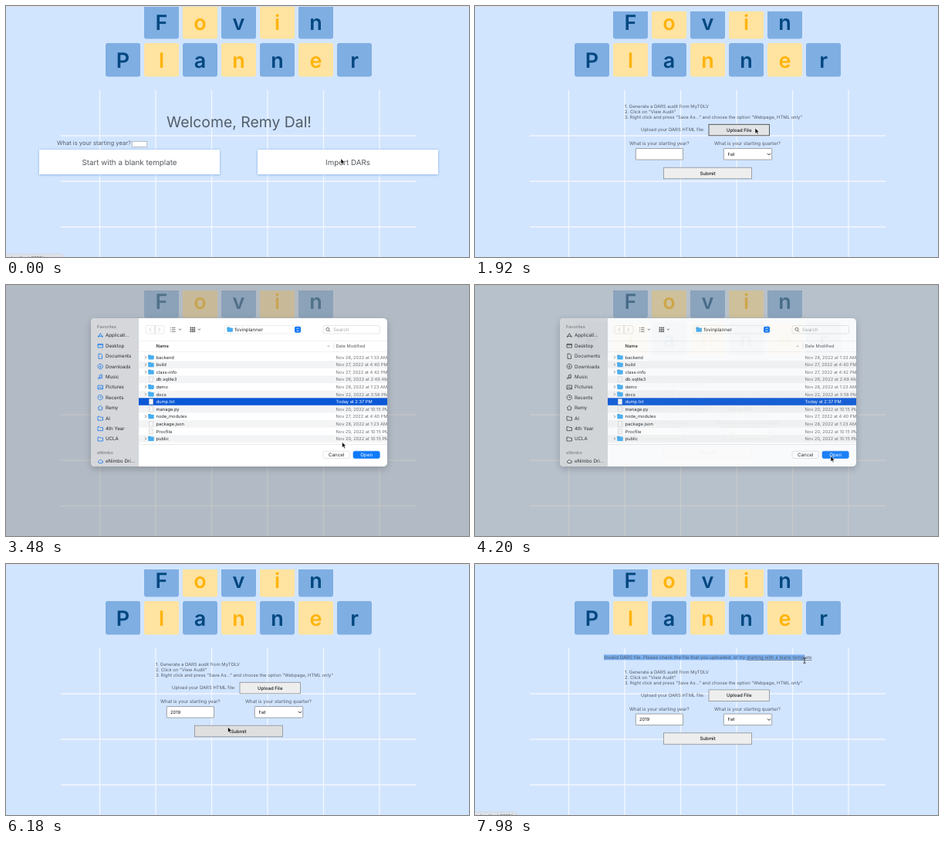
An HTML page that plays this animation: 600 by 325 pixels, repeating every 8 s.

```html
<!DOCTYPE html>
<html lang="en">
<head>
<meta charset="utf-8">
<title>Planner import</title>
<style>
html, body { margin: 0; width: 100%; height: 100%; overflow: hidden; background: #d2e5fe; }
svg { display: block; width: 600px; height: 325px; }
text { font-family: Inter, "Open Sans", sans-serif; white-space: pre; text-rendering: geometricPrecision; }
</style>
</head>
<body>
<svg id="stage" viewBox="0 0 600 325"></svg>
<script>
const LOOP = 8000;
const INK = '#535d6a', LABEL = '#55585e';
const stage = document.getElementById('stage');

const rect = (x, y, w, h, fill, extra = '') =>
  `<rect x="${x}" y="${y}" width="${w}" height="${h}" fill="${fill}" ${extra}/>`;
const text = (x, y, size, content, fill = INK, extra = '') =>
  `<text x="${x}" y="${y}" font-size="${size}" fill="${fill}" ${extra}>${content}</text>`;
const line = (d, stroke, width = 1, extra = '') =>
  `<path d="${d}" fill="none" stroke="${stroke}" stroke-width="${width}" ${extra}/>`;
const group = (id, content, extra = '') => `<g id="${id}" ${extra}>${content}</g>`;
const MIDDLE = 'text-anchor="middle"';

function tiles(word, left, top) {
  return [...word].map((letter, i) => {
    const x = left + i * 50, blue = i % 2 === 0;
    return rect(x, top, 45, 43.5, blue ? '#7faee2' : '#ffe3a0', 'rx="3"') +
      text(x + 22.5, top + 31.5, 27, letter, blue ? '#00477f' : '#ffb30a', `${MIDDLE} font-weight="600"`);
  }).join('');
}

function backdrop() {
  let grid = '';
  for (let i = 0; i < 6; i++) grid += `M${121.5 + i * 72.5} 109V325`;
  for (let i = 0; i < 3; i++) grid += `M71 ${168 + i * 59}H532`;
  return rect(0, 0, 600, 325, '#d2e5fe') + line(grid, '#f3f8ff', 1.3) +
    tiles('Fovin', 179, -1) + tiles('Planner', 129, 48);
}

function welcomePage() {
  const card = (x, label) => rect(x, 186, 234, 32, '#fff', 'filter="url(#glow)"') +
    text(x + 117, 205.5, 9.8, label, LABEL, MIDDLE);
  return text(302, 157, 19.4, 'Welcome, Remy Dal!', INK, MIDDLE) +
    text(66, 180, 7.6, 'What is your starting year?') +
    rect(163.3, 175.3, 19.5, 7, '#fff', 'stroke="#a3a8b0" stroke-width=".7"') +
    card(43, 'Start with a blank template') + card(326, 'Import DARs');
}

function button(id, x, y, w, label) {
  return rect(x, y, w, 14.5, '#eee', `id="${id}" stroke="#8b8f95" stroke-width=".8"`) +
    text(x + w / 2, y + 9.5, 6.05, label, '#15181c', `${MIDDLE} font-weight="500"`);
}

function importPage() {
  const steps = ['1. Generate a DARS audit from MyTOLV', '2. Click on "View Audit"',
    '3. Right click and press "Save As..." and choose the option "Webpage, HTML only"'];
  const field = (id, x, w) =>
    rect(x, 184.5, w, 14.5, '#fff', `id="${id}" rx=".5" stroke="#8b8f95" stroke-width=".8"`);
  const form = steps.map((step, i) => text(194, 132.2 + i * 7, 5.9, step)).join('') +
    text(215, 162.3, 5.95, 'Upload your DARS HTML file:') + button('upload', 303, 153.3, 78.5, 'Upload File') +
    text(200, 180.2, 6.15, 'What is your starting year?') +
    text(310, 180.2, 6.15, 'What is your starting quarter?') +
    field('yearField', 208.3, 61.2) + text(213, 193.7, 5.8, '', '#111', 'id="year"') +
    field('quarter', 322.3, 62.4) + text(327.5, 193.7, 5.6, 'Fall', '#111') +
    line('M379 190.8l2 2l2-2', '#222', 1) +
    button('submit', 244.5, 209.2, 114, 'Submit');
  const error = rect(167, 117.3, 0, 7, '#79aff1', 'id="selection"') +
    text(302, 123.2, 6.1, 'Invalid DARS file. Please check the file that you uploaded, or try ' +
      '<tspan text-decoration="underline">starting with a blank template</tspan>', INK, MIDDLE);
  return rect(0, 0, 600, 7, '#d2e5fe') + group('form', form) + group('error', error);
}

const folder = (x, y) => rect(x, y - 3.2, 3.6, 3, '#3d9be0', 'rx=".8"') +
  rect(x, y - 2.4, 7.4, 5.4, '#45adf0', 'rx=".8"');

function sidebar() {
  const outlineFolder = 'M0 1h2.5l1 1H6.5V6H0Z';
  const items = [
    ['Applicati...', 'M.3 6L3.3 .5L6.3 6M0 4.3H6.6'],
    ['Desktop', 'M0 1H6.5V5.6H0ZM0 2.2H6.5'],
    ['Documents', 'M1 .3H4L5.5 2V6.5H1Z'],
    ['Downloads', 'M3.2 0a3.2 3.2 0 1 0 .01 0M3.2 1.5V4.6M1.9 3.4L3.2 4.7L4.5 3.4'],
    ['Music', 'M2.3 5.2V1L5.3 .4V4.6M2.3 5.2a1 .8 0 1 1-.1-.5M5.3 4.6a1 .8 0 1 1-.1-.5'],
    ['Pictures', 'M0 1H6.5V5.8H0ZM.3 5.2L2.4 3L4 4.6L5 3.7L6.3 5'],
    ['Recents', 'M3.2 0a3.2 3.2 0 1 0 .01 0M3.2 1.4V3.4H4.8'],
    ['Remy', 'M0 3.2L3.2 .4L6.4 3.2M1 2.6V6H5.4V2.6'],
    ['AI', outlineFolder], ['4th Year', outlineFolder], ['UCLA', outlineFolder]];
  const item = ([label, icon], y) => line(icon, 'currentColor', .8, `transform="translate(119 ${y - 3.2})"`) +
    text(129, y + 2.2, 6.2, label, '#26282b');
  const heading = (label, y) => text(118, y, 5.6, label, '#85888c', 'font-weight="600"');
  return group('sidebar', rect(110, 43, 62, 192, '#d5d7da') + heading('Favorites', 56) +
    items.map((entry, i) => item(entry, 65.2 + i * 13.4)).join('') + heading('eNimbo', 219.2) +
    item(['eNimbo Dri...', 'M1.5 5.5a1.6 1.6 0 0 1 0-3a2 2 0 0 1 3.6 0a1.5 1.5 0 0 1 0 3Z'], 228.2));
}

function toolbar() {
  const caret = x => line(`M${x} 56.8l1.4 1.4l1.4-1.4`, '#444', .9);
  let dots = '';
  for (let i = 0; i < 9; i++) dots += rect(238.5 + i % 3 * 2.4, 54.5 + Math.floor(i / 3) * 2.4, 1.8, 1.8, '#555');
  return rect(181, 52.5, 24, 10.5, '#fff', 'rx="2" stroke="#e3e3e3" stroke-width=".7"') +
    line('M188 55.3l-2 2.5l2 2.5M197.5 55.3l2 2.5l-2 2.5M193 53V62.5', '#bfc1c4', .8) +
    line('M213 55.3h1M215 55.3h4.5M213 57.8h1M215 57.8h4.5M213 60.3h1M215 60.3h4.5', '#555', .8) +
    caret(224) + dots + caret(249) +
    rect(283, 52.5, 100, 10.5, '#fff', 'rx="2" stroke="#e6e6e6" stroke-width=".7"') +
    folder(286.5, 57.8) + text(296.5, 60, 6.2, 'fovinplanner', '#26282b') +
    rect(374, 53.8, 8, 8, '#1278f3', 'rx="1.8"') +
    line('M376.6 57L378 55.6L379.4 57M376.6 58.6L378 60L379.4 58.6', '#fff', .8) +
    rect(411, 52.5, 73.5, 10.5, '#fff', 'rx="2" stroke="#dcdcdc" stroke-width=".7"') +
    line('M418.9 57.3a2 2 0 1 0-4 0a2 2 0 1 0 4 0M418.3 58.8l1.8 1.8', '#555', .8) +
    text(424, 60, 6.2, 'Search', '#a5a7aa');
}

function fileList() {
  const at2022 = (day, time) => `Nov ${day}, 2022 at ${time}`;
  const files = [
    ['backend', at2022(28, '1:33 AM')], ['build', at2022(27, '4:40 PM')],
    ['class-info', at2022(27, '4:42 PM')], ['db.sqlite3', at2022(26, '2:49 AM')],
    ['demo', at2022(28, '1:23 AM')], ['docs', at2022(22, '3:58 PM')],
    ['dump.txt', 'Today at 2:37 PM'], ['manage.py', at2022(20, '10:15 PM')],
    ['node_modules', at2022(27, '4:40 PM')], ['package.json', at2022(28, '1:23 AM')],
    ['Procfile', at2022(20, '10:15 PM')], ['public', at2022(20, '10:15 PM')]];
  const head = text(194.5, 81.2, 5.8, 'Name', '#333', 'font-weight="600"') +
    text(427.5, 81.2, 5.7, 'Date Modified', '#55585c') +
    line('M416.5 80l1.5-1.5l1.5 1.5', '#888', .7) + line('M425 75V83', '#ddd', .7) +
    line('M172 72.5H494M172 86.5H494', '#ececec', .7);
  return head + files.map(([name, date], i) => {
    const y = 93.6 + i * 9.58;
    const isFolder = !name.includes('.') && name !== 'Procfile';
    const chosen = name === 'dump.txt';
    const icon = isFolder
      ? line(`M180 ${y - 1.8}l1.8 1.8l-1.8 1.8`, '#777', .8) + folder(184.3, y)
      : rect(185.5, y - 3.3, 5, 6.6, '#fff', 'stroke="#c9c9c9" stroke-width=".6"') +
        line(`M186.5 ${y - 1}h3M186.5 ${y + 1}h3`, '#ccc', .5);
    const stripe = chosen ? rect(172, y - 4.8, 322, 9.6, '#0a57d6', 'id="chosenRow"')
      : i % 2 ? rect(172, y - 4.8, 322, 9.6, '#f3f4f5') : '';
    const mark = chosen ? 'class="chosen"' : '';
    return stripe + icon + text(194.5, y + 2.1, 5.75, name, '#26282b', mark) +
      text(427.5, y + 2.1, 5.72, date, '#6d7074', mark);
  }).join('');
}

function dialog() {
  const pushButton = (id, x, label) =>
    rect(x, 215.2, 34.3, 9.2, '#fff', `id="${id}" rx="2" stroke="#d4d4d4" stroke-width=".6"`) +
    text(x + 17.2, 222.1, 6.2, label, '#26282b', `id="${id}Label" ${MIDDLE}`);
  return rect(110, 43, 384, 192, '#fff', 'rx="5" filter="url(#shadow)"') +
    group('panel', sidebar() + toolbar() + fileList() + line('M172 206.5H494', '#e2e2e2', .7) +
      pushButton('cancel', 411, 'Cancel') + pushButton('open', 450, 'Open'), 'clip-path="url(#panelClip)"');
}

stage.innerHTML = `<defs>
  <filter id="glow" x="-5%" y="-30%" width="110%" height="160%">
    <feDropShadow dx="0" dy="0.5" stdDeviation="1.8" flood-color="#5d93d6" flood-opacity=".75"/></filter>
  <filter id="shadow" x="-10%" y="-10%" width="120%" height="125%">
    <feDropShadow dx="0" dy="3" stdDeviation="5" flood-color="#000" flood-opacity=".22"/></filter>
  <clipPath id="panelClip">${rect(110, 43, 384, 192, '#fff', 'rx="5"')}</clipPath></defs>` +
  backdrop() + group('welcome', welcomePage()) + group('import', importPage()) +
  line('M0 .5H600', '#dcdee2', 1) +
  group('status', rect(-3, 321, 77, 8, '#dee2e8', 'id="statusBox" rx="2" stroke="#c3c8d0" stroke-width=".5"') +
    text(7, 327.5, 5.6, 'localhost:3000/app', '#555')) +
  rect(0, 0, 600, 325, '#989894', 'id="dim"') + group('dialog', dialog()) +
  group('arrow', '<path d="M0 0V7.2L1.7 5.7L2.9 8.3L4.1 7.7L2.9 5.2H5.1Z" fill="#000" stroke="#fff" stroke-width=".6"/>') +
  group('beam', line('M-1.5-3.5Q0-3.5 0-2.5Q0-3.5 1.5-3.5M0-3V3M-1.5 3.5Q0 3.5 0 2.5Q0 3.5 1.5 3.5', '#222', .8));

const $ = Object.fromEntries([...stage.querySelectorAll('[id]')].map(el => [el.id, el]));
const chosenTexts = stage.querySelectorAll('.chosen');

const clamp = v => Math.min(1, Math.max(0, v));
const ramp = (t, from, to) => clamp((t - from) / (to - from));
const ease = p => p * p * (3 - 2 * p);
const show = (el, on) => el.setAttribute('visibility', on ? 'visible' : 'hidden');
const set = (el, attrs) => { for (const key in attrs) el.setAttribute(key, attrs[key]); };

// time, x, y of the pointer tip
const pointerPath = [[480, 434, 197.5], [840, 447, 185], [1380, 363, 158], [2700, 363, 158], [2940, 362, 151],
  [3120, 362, 151], [3660, 461, 221.5], [4440, 461, 221.5], [5100, 238, 192], [5640, 238, 192],
  [5880, 275, 228], [6120, 287.5, 211], [6780, 287.5, 211], [7140, 167, 121], [7200, 167, 121],
  [7680, 430, 122], [7800, 430, 122], [7960, 427, 125]];

function pointerAt(t) {
  const next = pointerPath.findIndex(key => key[0] > t);
  if (next <= 0) return pointerPath[next ? pointerPath.length - 1 : 0].slice(1);
  const [t0, x0, y0] = pointerPath[next - 1], [t1, x1, y1] = pointerPath[next];
  const p = ease(ramp(t, t0, t1));
  return [x0 + (x1 - x0) * p, y0 + (y1 - y0) * p];
}

function render(t) {
  const [x, y] = pointerAt(t);
  const selecting = t >= 7110;
  show($.arrow, !selecting);
  show($.beam, selecting);
  set(selecting ? $.beam : $.arrow, { transform: `translate(${x} ${y})` });

  const importing = t >= 360;
  show($.welcome, !importing);
  show($.import, importing);
  show($.status, t < 420 || t >= 7500);
  set($.statusBox, { width: t < 420 ? 77 : 57 });

  const submitHover = t >= 6060 && t < 6840;
  set($.upload, { fill: t >= 1320 && t < 2100 ? '#e2e3e5' : '#eee',
    stroke: t >= 1860 && t < 2100 ? '#33373c' : '#8b8f95' });
  set($.submit, { fill: submitHover ? '#dfdfdf' : '#eee' });
  const focused = t >= 5100 && t < 6120;
  set($.yearField, { stroke: focused ? '#222' : '#8b8f95', 'stroke-width': focused ? 1.2 : .8 });
  $.year.textContent = '2019'.slice(0, Math.max(0, Math.floor((t - 5340) / 90) + 1));

  const failed = t >= 6540;
  show($.error, importing && failed);
  set($.form, { transform: `translate(0 ${failed ? 9.6 : 0})` });
  set($.selection, { width: selecting ? Math.max(0, Math.min(x, 428) - 167) : 0 });

  const opening = ease(ramp(t, 2100, 2400));
  set($.dim, { opacity: .53 * opening * (1 - ramp(t, 4185, 4335)) });
  set($.dialog, {
    opacity: opening * (1 - ramp(t, 4190, 4330)),
    transform: `translate(0 ${t < 2700 ? 1 : 0})`
  });
  // the icons lose their tint once the closing window is inactive
  set($.sidebar, { color: t < 4140 ? '#1677ee' : '#34373a' });
  const picked = t >= 3000;
  show($.chosenRow, picked);
  chosenTexts.forEach((el, i) => set(el, { fill: picked ? '#fff' : i ? '#6d7074' : '#26282b' }));
  set($.open, { fill: picked ? '#0f7bfa' : '#fff', stroke: picked ? '#0f7bfa' : '#e4e4e4' });
  set($.openLabel, { fill: picked ? '#fff' : '#b8babd' });
}

function tick() {
  render(performance.now() % LOOP);
  requestAnimationFrame(tick);
}
tick();
</script>
</body>
</html>
```
